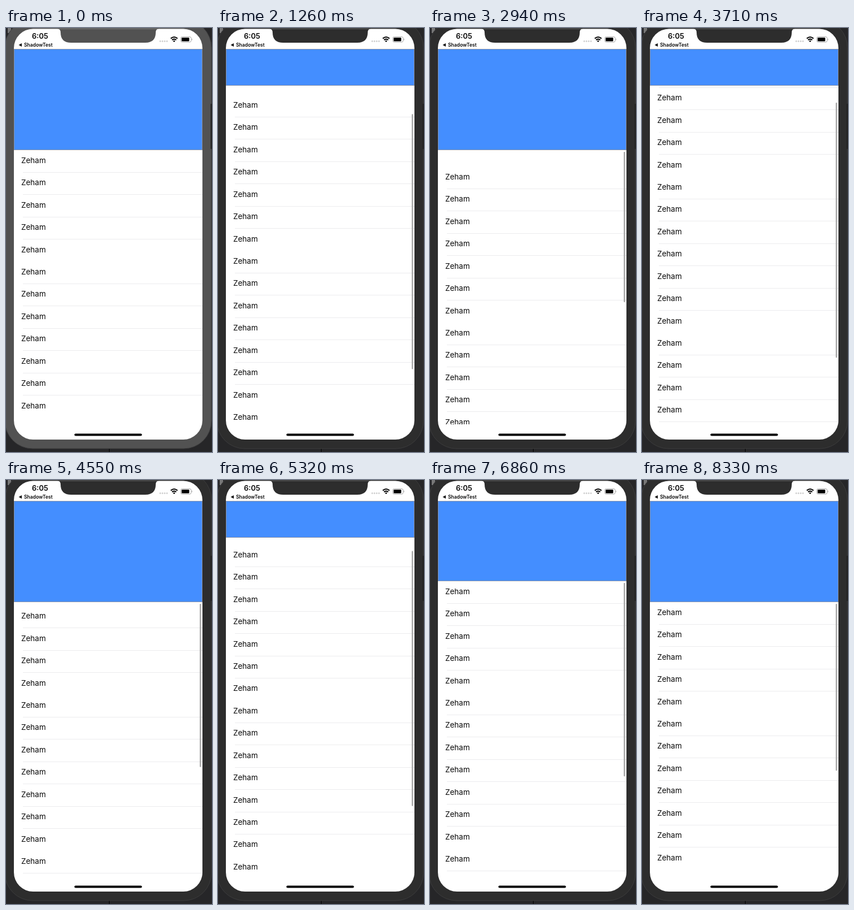
An HTML page that plays this animation: 366x750 px, repeating every 9310 ms.

```html
<!DOCTYPE html>
<html lang="en">
<head>
<meta charset="utf-8">
<title>Collapsing header</title>
<style>
  html, body { margin: 0; width: 100%; height: 100%; overflow: hidden; background: #232325; }
  svg { display: block; width: 366px; height: 750px; }
  text { font-family: Inter, "Liberation Sans", sans-serif; fill: #080808; }
</style>
</head>
<body>
<svg viewBox="0 0 366 750">
  <defs>
    <clipPath id="screenClip"><rect x="14" y="1.5" width="335" height="726.5" rx="34"/></clipPath>
    <clipPath id="tableClip"><rect x="14" y="38" width="335" height="663"/></clipPath>
  </defs>
  <rect width="366" height="750" fill="#262628"/>
  <rect x="3" width="6" height="9" fill="#777"/>
  <rect x="183" y="744" width="1" height="6" fill="#000"/>
  <rect class="bezel" x="-2" y="-14.5" width="367" height="758.5" rx="49" stroke="#3c3c3d"/>
  <rect x="363.5" y="134" width="2.5" height="80" rx="1" fill="#222"/>
  <g clip-path="url(#screenClip)">
    <rect x="14" y="0" width="335" height="730" fill="#fff"/>
    <g id="rows" clip-path="url(#tableClip)"></g>
    <rect id="header" x="14.5" y="37.5" width="334" fill="#448eff" stroke="#8592aa"/>
    <rect id="bar" x="344.2" width="2.6" rx="1.3" fill="#a9a9a9"/>
    <path class="bezel" d="M92 0V1.5Q97 2 97 8Q97 26 116 26H247Q266 26 266 8Q266 2 271 1.5V0Z"/>
    <text x="46" y="19" font-size="13" font-weight="600">6:05</text>
    <path d="M22.5 30L28 27V33Z" fill="#111"/>
    <text x="32" y="33" font-size="8.6" font-weight="600">ShadowTest</text>
    <g fill="#cfcfcf">
      <circle cx="274" cy="23.5" r="1.4"/><circle cx="278" cy="23.5" r="1.4"/>
      <circle cx="282" cy="23.5" r="1.4"/><circle cx="286" cy="23.5" r="1.4"/>
    </g>
    <g fill="none" stroke="#000" stroke-width="2.1">
      <path d="M292.8 18.6Q298.7 13.4 304.6 18.6"/>
      <path d="M295 21.3Q298.7 18 302.4 21.3"/>
    </g>
    <path d="M296.7 22.9Q298.7 21.2 300.7 22.9L298.7 25Z"/>
    <rect x="310.5" y="15.5" width="18.5" height="9.5" rx="2.8" fill="none" stroke="#a5a5a5"/>
    <rect x="312" y="17" width="13.5" height="6.5" rx="1.3"/>
    <path d="M330 18.5Q332 20.2 330 22Z" fill="#a5a5a5"/>
    <rect x="121.5" y="717.4" width="120" height="4" rx="2"/>
  </g>
</svg>
<script>
  const LOOP = 9310, STEP = 70;
  const ROWS = 20, ROW_HEIGHT = 276 / 7, CONTENT = ROWS * ROW_HEIGHT;
  const HEADER_OPEN = 216, HEADER_CLOSED = 102, TABLE_BOTTOM = 701;
  const COLLAPSE = HEADER_OPEN - HEADER_CLOSED;

  // [time, scroll]; scrolling first collapses the header, then moves the list
  const KEYS = [
    [0, 0], [770, 0], [1260, 176.7], [1610, 290], [1820, 304], [2030, 280],
    [2450, 80], [2730, -14], [2940, -29.14], [3010, -30], [3080, -30],
    [3430, 90], [3710, 150], [3780, 150], [4060, 50], [4270, 0], [4340, 0],
    [4550, -6.43], [4830, 0], [4900, 0], [5390, 170], [5740, 312],
    [5880, 324], [6090, 312], [6160, 312], [6510, 180], [6860, 37],
    [7000, 20], [7280, 20], [7770, 150], [8190, -1], [8260, -1],
    [8330, 0], [LOOP, 0]
  ];

  const svgNode = (parent, tag, attrs) => {
    const node = document.createElementNS("http://www.w3.org/2000/svg", tag);
    setAttrs(node, attrs);
    return parent.appendChild(node);
  };
  function setAttrs(node, attrs) {
    for (const name in attrs) node.setAttribute(name, attrs[name]);
  }
  const clamp = (v, lo, hi) => Math.min(hi, Math.max(lo, v));

  const header = document.getElementById("header");
  const bar = document.getElementById("bar");
  const bezels = document.querySelectorAll(".bezel");
  const rowGroup = document.getElementById("rows");
  const rows = Array.from({ length: ROWS }, () => {
    const label = svgNode(rowGroup, "text", { x: 27, "font-size": 13.5 });
    label.textContent = "Zeham";
    const line = svgNode(rowGroup, "rect", { x: 30, width: 319, height: 1, fill: "#ececee" });
    return { label, line };
  });

  const slope = i => (KEYS[i + 1][1] - KEYS[i][1]) / (KEYS[i + 1][0] - KEYS[i][0]);
  function tangent(i) {
    if (i === 0 || i === KEYS.length - 1) return 0;
    const a = slope(i - 1), b = slope(i);
    return a * b > 0 ? 2 * a * b / (a + b) : 0;
  }

  // Monotone cubic interpolation between the keys
  function scrollAt(time) {
    let i = 0;
    while (i < KEYS.length - 2 && KEYS[i + 1][0] <= time) i++;
    const [t0, p0] = KEYS[i], [t1, p1] = KEYS[i + 1];
    const span = t1 - t0, u = (time - t0) / span, v = 1 - u;
    return p0 * (1 + 2 * u) * v * v + p1 * (3 - 2 * u) * u * u
      + span * u * v * (tangent(i) * v - tangent(i + 1) * u);
  }

  function draw(time) {
    const scroll = scrollAt(time);
    const shrink = clamp(scroll, 0, COLLAPSE);
    const offset = scroll - shrink;
    const top = HEADER_OPEN - shrink;
    setAttrs(header, { height: Math.round(top) - 38 });

    rows.forEach(({ label, line }, i) => {
      const y = top - offset + i * ROW_HEIGHT;
      // Hairlines drop out where they fall between sampled pixels
      const edge = y + ROW_HEIGHT - 0.08;
      const hidden = edge - Math.floor(edge) < 0.14;
      setAttrs(label, { y: Math.round(y + 22.8) });
      setAttrs(line, { y: Math.floor(edge), opacity: hidden ? 0 : 1 });
    });

    const height = TABLE_BOTTOM - top, track = height - 5;
    const maxOffset = CONTENT - height;
    const over = Math.max(0, -offset, offset - maxOffset);
    const length = track * height / CONTENT - over;
    const barTop = clamp(offset / CONTENT * track, 0, track - length);
    setAttrs(bar, { y: top + 3 + barTop, height: length, opacity: time < 840 ? 0 : 1 });

    const dim = clamp((time - 490) / 210, 0, 1);
    const grey = Math.round(82 - 37 * dim);
    bezels.forEach(node => setAttrs(node, { fill: `rgb(${grey},${grey},${grey})` }));
  }

  const start = performance.now();
  function tick() {
    const time = (performance.now() - start) % LOOP;
    draw(Math.floor(time / STEP) * STEP);
    requestAnimationFrame(tick);
  }
  draw(0);
  requestAnimationFrame(tick);
</script>
</body>
</html>
```
